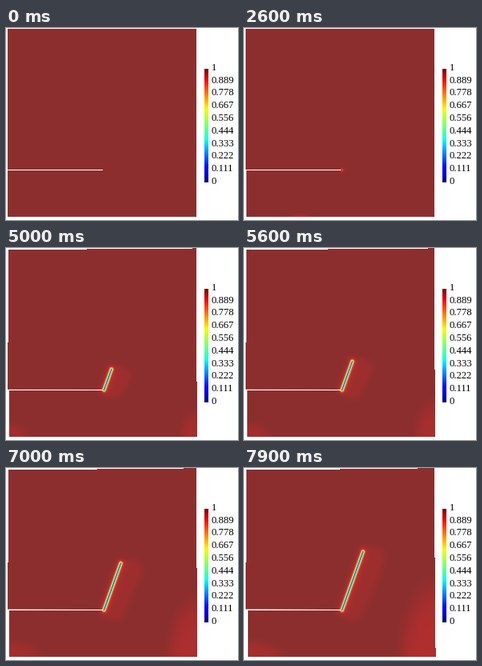
A matplotlib script that plays this animation: 290x240 px, repeating every 8 s.

```python
import numpy as np
import matplotlib.pyplot as plt
from matplotlib.animation import FuncAnimation

W, H, DPI = 290, 240, 100
FRAMES, STEP = 80, 100
NOTCH_X, NOTCH_Y = 121, 177
ROOT = np.array([122.5, 177.5])     # where the crack leaves the notch
CRACK_DIR = np.array([0.36, -1.0])  # per pixel of crack height
SPEED, START = 16.2, 3.4            # crack growth: px/s, s

X, Y = np.meshgrid(np.arange(W) + 0.5, np.arange(H) + 0.5)
jet = plt.get_cmap("jet", 512)


def lit(c):
    """Jet colour with the flat lighting of the plate."""
    return 0.184 + 0.745 * jet(c)[..., :3]


def ramp(t, a, b):
    return float(np.clip((t - a) / (b - a), 0, 1))


def distance(a, b):
    """Distance of every pixel from the segment a-b."""
    ux, uy = b - a
    s = ((X - a[0]) * ux + (Y - a[1]) * uy) / (ux * ux + uy * uy + 1e-9)
    s = np.clip(s, 0, 1)
    return np.hypot(X - a[0] - s * ux, Y - a[1] - s * uy)


def patch(cx, cy, rx, ry):
    """Flat elliptic zone with a fairly sharp rim."""
    return np.exp(-(((X - cx) / rx) ** 2 + ((Y - cy) / ry) ** 2) ** 3)


def damage(t):
    tip = ROOT + CRACK_DIR * SPEED * max(t - START, 0)
    r = distance(ROOT, tip)
    wake = distance(ROOT + (13, -2), tip + (12, 9))
    onset, late = ramp(t, 2.6, 4.1), ramp(t, 4.1, 7.9)

    d = (0.15 * ramp(t, 1.3, 2.6) + 0.65 * ramp(t, 2.6, 3.6)) * np.exp(-(r / 1.7) ** 1.5)
    d += 0.035 * onset * np.exp(-(r / 6) ** 2)
    d += 0.02 * onset * np.exp(-(wake / (12 + 4 * late)) ** 4)
    d += 0.04 * ramp(t, 1.6, 2.6) * (1 - onset) * patch(70, 238, 17, 5)
    d += 0.025 * onset * patch(4, 240, 18 + 27 * late, 18 + 6 * late)
    d += (0.025 + 0.015 * late) * onset * patch(242, 240, 17 + 27 * late, 18 + 72 * late)
    return d


def plate_cover(t):
    """Share of each pixel covered by the deformed plate."""
    k, late = ramp(t, 1.3, 4.1), ramp(t, 4.1, 7.9)
    turned = k > 0.8

    # the part above the notch turns, the part below slides to the right
    slide = int(t > 0) + round(0.6 * k + 0.9 * late)
    left = 2 + np.where(Y > NOTCH_Y + 1, slide, turned * (Y < 118))
    right = 238 + np.floor(Y / 236 * (1.2 * k + 0.9 * late))
    top = 1 + turned * (X < 95 + 25 * late) - (X > 238 - 21 * late)
    inside = (X > left) & (X < right) & (Y > top) & (Y < 236)

    gap_top = NOTCH_Y - 0.5 * late * (1 - X / NOTCH_X)
    gap = np.minimum(Y + 0.5, NOTCH_Y + 1) - np.maximum(Y - 0.5, gap_top)
    return inside * np.where(X < NOTCH_X, 1 - np.clip(gap, 0, 1), 1)


def draw_stage(t):
    img = 1 - plate_cover(t)[..., None] * (1 - lit(1 - damage(t)))
    img[51:193, 248:253] = jet(np.linspace(1, 0, 142))[:, None, :3]
    return img


fig = plt.figure(figsize=(W / DPI, H / DPI), dpi=DPI, facecolor="white")
ax = fig.add_axes([0, 0, 1, 1])
ax.axis("off")
picture = ax.imshow(draw_stage(0), extent=(0, W, H, 0),
                    interpolation="nearest", aspect="auto")
ax.set(xlim=(0, W), ylim=(H, 0))

for i in range(10):
    ax.text(256.5, 53 + 15.75 * i, f"{1 - i / 9:.3g}", family="Liberation Serif",
            size=12.6 * 72 / DPI, color="black", va="baseline")


def update(n):
    picture.set_data(draw_stage(n * STEP / 1000))
    return [picture]


anim = FuncAnimation(fig, update, frames=FRAMES, interval=STEP,
                     repeat=True, repeat_delay=0)
plt.show()
```
